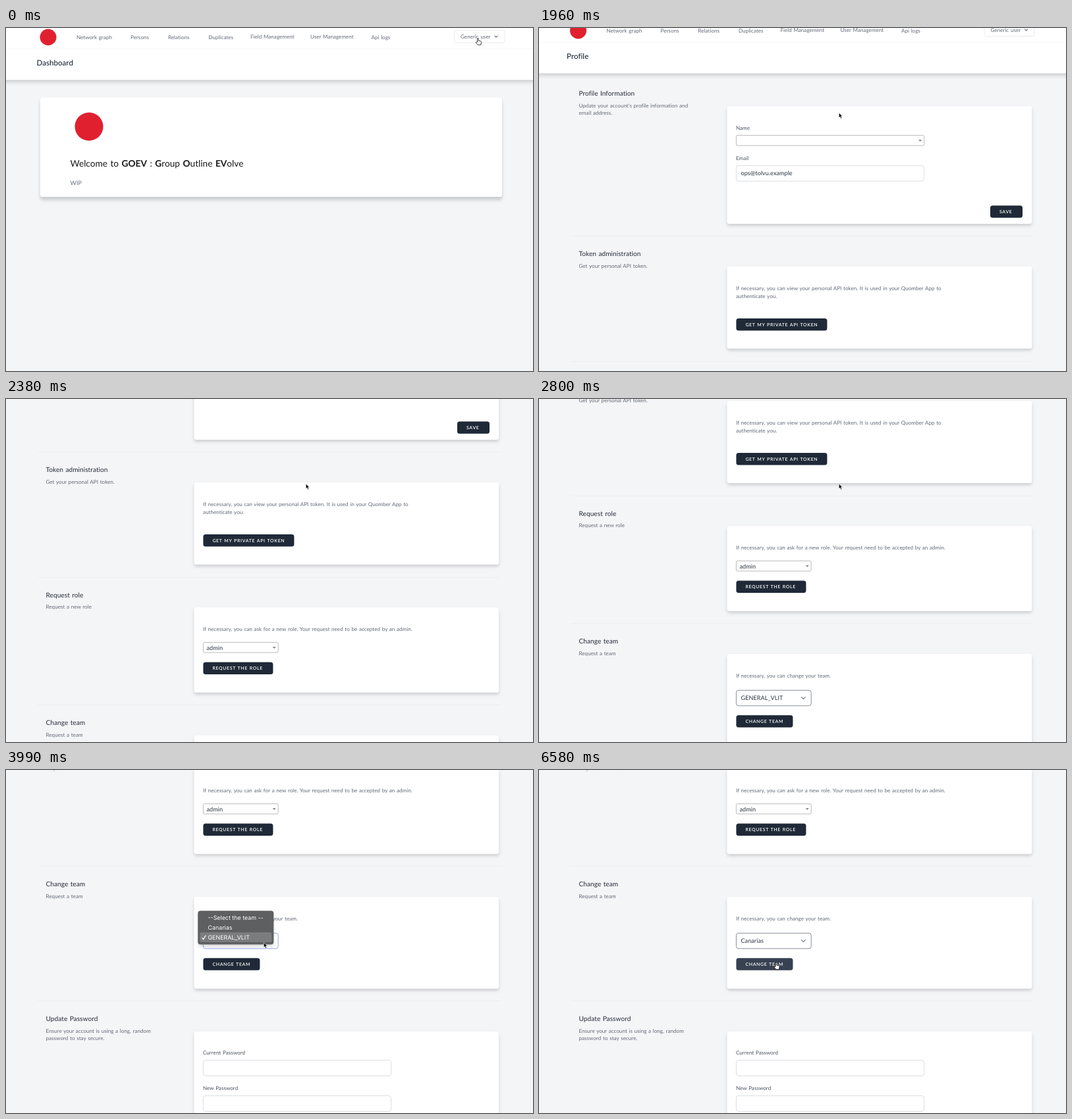
An HTML page for the animation above (6650 ms loop, 800 by 522 pixels).

```html
<!DOCTYPE html>
<html lang="en">
<head>
<meta charset="utf-8">
<title>Profile demo</title>
<style>
html, body { margin: 0; width: 100%; height: 100%; overflow: hidden; background: #f4f5f7; }
svg { display: block; width: 800px; height: 522px; }
text { font: 8.05px Lato, "Open Sans", sans-serif; fill: #636a77; letter-spacing: .004em; word-spacing: .07em;
  text-rendering: geometricPrecision; white-space: pre; }
.title { font-size: 11.5px; font-weight: 500; fill: #1f2937; }
.heading { font-size: 10.15px; fill: #252d3a; }
.label { fill: #4b5360; }
.field { font-size: 9.1px; fill: #2b3340; }
.welcome { font-size: 13.7px; fill: #1a1a1a; letter-spacing: 0; }
.welcome tspan { font-weight: 700; }
.caps { font-size: 6.9px; font-weight: 600; fill: #fff; letter-spacing: .1em; }
.small { font-size: 6.9px; fill: #9ca3af; }
.menu { font: 8.9px Inter, "Liberation Sans", sans-serif; fill: #fff; letter-spacing: 0; word-spacing: 0; }
.card { fill: #fff; filter: drop-shadow(0 3px 2.5px rgba(0,0,0,.13)) drop-shadow(0 3px 2px rgba(0,0,0,.03)); }
.deep { filter: drop-shadow(0 4px 2.5px rgba(0,0,0,.12)) drop-shadow(0 6px 2px rgba(0,0,0,.06)); }
.bar { fill: #fff; filter: drop-shadow(0 3px 3px rgba(0,0,0,.17)); }
.button { fill: #1f2937; }
.input { fill: #fff; stroke: #d1d5db; stroke-width: .8; }
.picker { fill: #fff; stroke: #aaa; stroke-width: .8; }
.chevron { fill: none; stroke: #6b7280; stroke-width: 1.1; stroke-linecap: round; stroke-linejoin: round; }
.rule { stroke: #e9ebee; stroke-width: .7; }
</style>
</head>
<body>
<svg id="stage" viewBox="0 0 800 522"></svg>
<script>
const LOOP = 6650, STEP = 70;
const USER = 'Generic user', TEAM = 'GENERAL_VLIT', NEW_TEAM = 'Canarias';

const text = (x, y, content, cls = '', id = '') => `<text x="${x}" y="${y}" class="${cls}" id="${id}">${content}</text>`;
const box = (x, y, w, h, cls, r = 3.5, id = '') =>
  `<rect x="${x}" y="${y}" width="${w}" height="${h}" rx="${r}" class="${cls}" id="${id}"/>`;
const button = (x, y, w, label, id) => box(x, y, w, 18.5, 'button', 3.5, id) + text(x + 14, y + 11.7, label, 'caps');
const chevron = (x, y, s) => `<path class="chevron" d="M${x - s} ${y - s / 2}l${s} ${s} ${s} ${-s}"/>`;
const picker = (y, w, value) => box(299.4, y, w, 15.5, 'picker', 2) + text(304.5, y + 11.3, value, 'field')
  + `<path fill="#888" d="M${293.4 + w - 2.5} ${y + 6.6}h5l-2.5 3z"/>`;
const logo = (x, y, r) => `<circle cx="${x}" cy="${y}" r="${r}" fill="#e0202f"/>`;
const rule = y => `<path class="rule" d="M48 ${y}H750"/>`;

const links = [[107, 'Network graph'], [189, 'Persons'], [246, 'Relations'], [307.5, 'Duplicates'],
  [371, 'Field Management', 1], [462, 'User Management', 1], [554.5, 'Api logs']];

const header = (dx, title) => box(-10, -20, 820, 99, 'bar', 0)
  + `<path stroke="#fafafb" d="M0 31.5H800"/><g transform="translate(${dx})">` + logo(64, 14, 12.5)
  + links.map(([x, label, up = 0]) => text(x, 16.8 - up, label)).join('')
  + box(680.5, 3.5, 76.5, 19, 'input" style="stroke:#e5e7eb', 3) + text(690, 15.6, USER) + chevron(744, 13, 2)
  + text(46.5, 57.3, title, 'title') + '</g>';

// A settings section: heading and notes on the left, card on the right.
const section = (y, heading, notes, cardHeight, body) => text(60.5, y, heading, 'heading')
  + notes.map((note, i) => text(60.5, y + 17.3 + i * 11.5, note)).join('')
  + box(285.5, y + 15.7, 462.8, cardHeight, 'card') + body;

const dashboard = header(0, 'Dashboard') + box(52, 106, 701, 151, 'card deep') + logo(126, 150, 21.5)
  + text(97.5, 210.8, 'Welcome to <tspan>GOEV</tspan> : <tspan>G</tspan>roup <tspan>O</tspan>utline <tspan>EV</tspan>olve', 'welcome')
  + text(97.5, 238.8, 'WIP', 'field" style="fill:#6b7280')
  + '<g id="account">' + box(648, 26, 109, 64, 'card')
  + text(657, 39, 'Manage Account', 'small') + box(648, 45, 109, 20.5, '" fill="#f3f4f6', 0, 'hover')
  + text(657, 58, 'Profile', 'label') + '<path class="rule" d="M648 66H757"/>' + text(657, 79, 'Logout', 'label') + '</g>';

const profile = header(-4.5, 'Profile')
  + section(113.3, 'Profile Information', ["Update your account's profile information and", 'email address.'], 179,
    text(299, 165, 'Name', 'label') + picker(173.4, 285.2, '')
    + text(299, 211, 'Email', 'label') + box(299.4, 219.3, 285.2, 23.8, 'input') + text(306.5, 234, 'ops@tolvu.example', 'field')
    + button(685, 280.3, 49, 'SAVE'))
  + rule(326.5)
  + section(357.2, 'Token administration', ['Get your personal API token.'], 125,
    text(299, 409, 'If necessary, you can view your personal API token. It is used in your Quomber App to')
    + text(299, 420.5, 'authenticate you.') + button(299.4, 452, 138, 'GET MY PRIVATE API TOKEN'))
  + rule(517.5)
  + section(547.6, 'Request role', ['Request a new role'], 129.5,
    text(299, 599.3, 'If necessary, you can ask for a new role. Your request need to be accepted by an admin.')
    + picker(616.4, 113.8, 'admin') + button(299.4, 646.5, 106, 'REQUEST THE ROLE'))
  + rule(711.5)
  + section(742.2, 'Change team', ['Request a team'], 139.8,
    text(299, 793.7, 'If necessary, you can change your team.')
    + box(299.4, 813.3, 113.8, 23.5, 'input', 3.5, 'team') + text(306.5, 828, TEAM, 'field', 'teamName')
    + chevron(401.3, 825.2, 3) + button(299.4, 851.2, 86, 'CHANGE TEAM', 'change'))
  + rule(916.5)
  + section(947.2, 'Update Password', ['Ensure your account is using a long, random', 'password to stay secure.'], 300,
    text(299, 998.3, 'Current Password', 'label') + box(299.4, 1006.7, 285.2, 23.8, 'input')
    + text(299, 1052.3, 'New Password', 'label') + box(299.4, 1060.7, 285.2, 23.8, 'input'));

const teamMenu = box(291.3, 214.3, 115, 51.2, 'card" style="fill:#5e5f61', 4)
  + box(294.3, 247, 109, 15, '', 2, 'choice')
  + ['--Select the team --', NEW_TEAM, TEAM].map((row, i) => text(306.5, 227.8 + i * 15, row, 'menu')).join('')
  + '<path d="M297.5 255l2 2.6 3.8-6" fill="none" stroke="#fff" stroke-width="1.2"/>';

stage.innerHTML = `<rect width="800" height="522" fill="#f4f5f7"/><g id="home">${dashboard}</g><g id="page">${profile}</g>
  <g id="options">${teamMenu}</g><g id="cursor" stroke-linejoin="round">
  <path id="arrow" d="M0 0V7.6L1.7 6.1 2.9 8.9 4.3 8.3 3.1 5.6H5.4z" stroke="#fff" stroke-width=".6"/>
  <path id="hand" d="M-.9 6V1a.9.9 0 0 1 1.8 0V3.8L4 4.5Q5.1 4.8 5.1 6L4.3 10.3H.1L-3.2 6.6Q-2.7 5.4-1.9 5.9z" fill="#fff" stroke="#222" stroke-width=".9"/></g>`;

const el = Object.fromEntries([...stage.querySelectorAll('[id]')].filter(e => e.id).map(e => [e.id, e]));
const show = (node, on) => node.setAttribute('display', on ? 'inline' : 'none');
const smooth = p => p * p * (3 - 2 * p);

// Value of a keyframe track [[time, value], ...] at time t.
function track(keys, t, ease = p => p) {
  const i = keys.findIndex(k => k[0] > t);
  if (i < 0) return keys[keys.length - 1][1];
  if (!i) return keys[0][1];
  const [t0, a] = keys[i - 1], [t1, b] = keys[i];
  return a + (b - a) * ease((t - t0) / (t1 - t0));
}

const scrollKeys = [[1890, 0], [1960, 10], [2100, 80], [2380, 246], [2660, 345], [2940, 395], [3290, 497], [3570, 565]];
const path = [[490, 716.4, 15.5], [840, 690, 54], [1330, 690, 54], [1890, 455.3, 129], [3500, 455.3, 129], [3780, 391.3, 262.5],
  [4060, 391.3, 262.5], [4550, 345, 241], [5180, 345, 241], [5320, 364.7, 259.8], [5810, 360, 293.3]];
const xKeys = path.map(([t, x]) => [t, x]), yKeys = path.map(([t, , y]) => [t, y]);

function draw(now) {
  const t = Math.floor(now % LOOP / STEP) * STEP;
  const x = track(xKeys, t, smooth), y = track(yKeys, t, smooth);
  const onProfile = t >= 1330, focused = t >= 3850 && t < 6160, overButton = t > 5400 && y > 286;

  show(el.home, !onProfile);
  show(el.page, onProfile);
  show(el.account, t >= 490);
  show(el.hover, y > 45);
  el.page.setAttribute('transform', `translate(0 ${-track(scrollKeys, t)})`);

  el.team.style.stroke = focused ? '#7c8fe8' : '#6b7280';
  el.teamName.textContent = t < 5390 ? TEAM : NEW_TEAM;
  el.change.style.fill = overButton ? '#374151' : '';

  el.options.setAttribute('opacity', t < 3850 ? 0 : track([[5240, 1], [5390, 0]], t));
  el.choice.setAttribute('y', t < 4410 ? 247 : 232);
  el.choice.setAttribute('fill', t < 4060 ? '#7b7c7d' : '#4a8df6');

  const pointing = !onProfile || overButton;
  show(el.hand, pointing);
  show(el.arrow, !pointing);
  el.cursor.setAttribute('transform', `translate(${x} ${y})`);
}

function frame() {
  draw(performance.now());
  requestAnimationFrame(frame);
}
frame();
</script>
</body>
</html>
```
